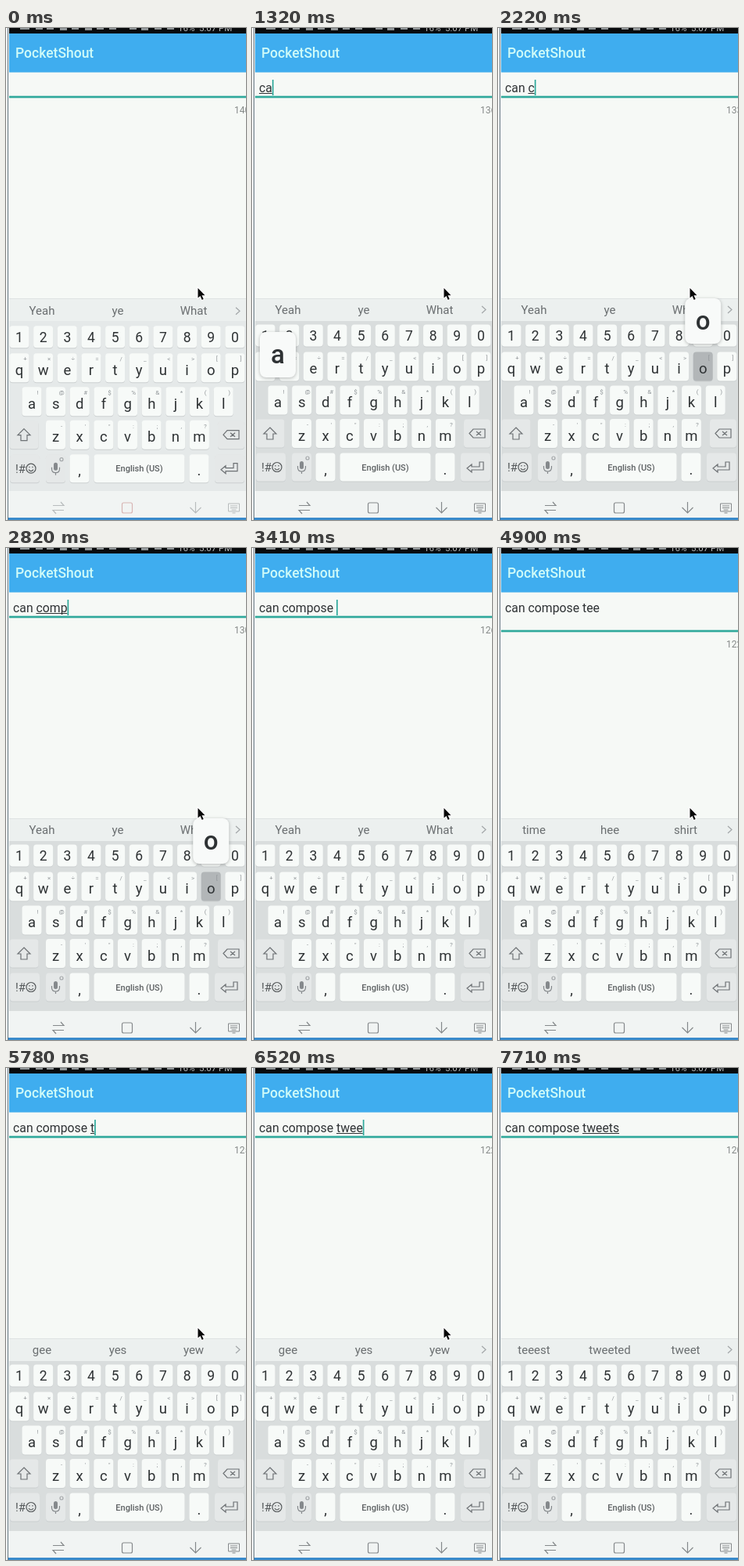
An HTML page with a canvas for the animation above (8000 ms loop, 307 px wide and 628 px high).

```html
<!DOCTYPE html>
<html lang="en">
<head>
<meta charset="utf-8">
<style>
html, body { margin: 0; width: 307px; height: 628px; overflow: hidden; background: #f6f9f6; }
canvas { display: block; }
</style>
</head>
<body>
<canvas id="stage" width="307" height="628"></canvas>
<script>
const ctx = document.getElementById('stage').getContext('2d');
const LOOP = 8000;
const FONT = 'Roboto, "Noto Sans", sans-serif';
const TEAL = '#2fa99b';
const INK = '#2e3234';

// [time, typed text, key with popup or highlight, key still held down]
const STEPS = [
  [0, ''], [580, '', 'i', 1], [730, 'I', 'i'], [880, 'I', ' ', 1],
  [1030, 'I ', 'c', 1], [1180, 'I c', 'a', 1], [1320, 'I ca', 'a'],
  [1470, 'I ca', 'n', 1], [1620, 'I can', 'n'], [1770, 'I can', ' ', 1],
  [1920, 'I can ', 'c', 1], [2070, 'I can c', 'c'], [2220, 'I can c', 'o', 1],
  [2370, 'I can co', 'o'], [2520, 'I can co', 'm', 1], [2670, 'I can com', 'p', 1],
  [2820, 'I can comp', 'o', 1], [2970, 'I can compo', 's', 1],
  [3120, 'I can compos', 'e', 1], [3260, 'I can compose', ' ', 1], [3410, 'I can compose '],
  [3860, 'I can compose ', 't', 1], [4010, 'I can compose t', 't'],
  [4160, 'I can compose t', 'e', 1], [4310, 'I can compose te', 'e'],
  [4450, 'I can compose te', 'e', 1], [4600, 'I can compose tee', 'e'],
  [4750, 'I can compose tee', 'enter', 1], [4900, 'I can compose tee\n'],
  [5040, 'I can compose tee\n', 'back', 1], [5190, 'I can compose tee'],
  [5480, 'I can compose tee', 'back', 1], [5630, 'I can compose te', 'back', 1],
  [5780, 'I can compose t'], [5930, 'I can compose t', 'w', 1],
  [6080, 'I can compose tw', 'w'], [6220, 'I can compose tw', 'e', 1],
  [6370, 'I can compose twe', 'e', 1], [6520, 'I can compose twee'],
  [6660, 'I can compose twee', 't', 1], [6810, 'I can compose tweet', 't'],
  [6960, 'I can compose tweet'], [7110, 'I can compose tweet', 's', 1],
  [7260, 'I can compose tweets', 's'], [7410, 'I can compose tweets']
];
const HINTS = [
  [0, 'Yeah', 'ye', 'What'], [4750, 'time', 'hee', 'shirt'],
  [5780, 'gee', 'yes', 'yew'], [7560, 'teeest', 'tweeted', 'tweet']
];
const CURSOR_OFF = [[3560, 3860], [7560, LOOP]];

// Keyboard layout: centre x, centre y, width, height
const keys = {};
function addRow(chars, alts, x, y, h) {
  [...chars].forEach((c, i) => keys[c] = { x: x + 30.65 * i, y, w: 25, h, alt: alts[i] });
}
addRow('1234567890', '', 17, 392.5, 28);
addRow('qwertyuiop', '+×÷=/_<>[]', 17, 432, 37);
addRow('asdfghjkl', '!@#$%&*()', 33, 475, 37);
addRow('zxcvbnm', '-\'":;,?', 63.5, 517.5, 37);
const special = (x, y, w, fill) => ({ x, y, w, h: 36, fill, label: '' });
keys.shift = special(23, 517.5, 37, '#e5e8e8');
keys.back = special(288, 517.5, 34, '#e5e8e8');
keys.sym = special(24, 560.5, 38, '#e5e8e8');
keys.mic = special(63.5, 560.5, 25, '#e5e8e8');
keys[','] = { x: 94, y: 560.5, w: 25, h: 36 };
keys[' '] = special(170.5, 560.5, 116);
keys['.'] = { x: 247, y: 560.5, w: 25, h: 36 };
keys.enter = special(286, 560.5, 38, '#e5e8e8');

const at = (list, t) => list.findLast(s => s[0] <= t);

function rect(x, y, w, h, color) {
  ctx.fillStyle = color;
  ctx.fillRect(x, y, w, h);
}
function text(s, x, y, size, color, align = 'left', weight = 400) {
  ctx.font = `${weight} ${size}px ${FONT}`;
  ctx.textAlign = align;
  ctx.fillStyle = color;
  ctx.fillText(s, x, y);
  return ctx.measureText(s).width;
}
function box(x, y, w, h, r, color) {
  ctx.beginPath();
  ctx.roundRect(x, y, w, h, r);
  ctx.fillStyle = color;
  ctx.fill();
}
function stroke(d, color = '#6d7174', width = 1.2) {
  ctx.strokeStyle = color;
  ctx.lineWidth = width;
  ctx.stroke(new Path2D(d));
}

function drawHeader() {
  rect(0, 0, 307, 628, '#f6f9f6');
  rect(4, 0, 303, 7, '#080a0c');
  for (const x of [18, 38, 52, 69, 84, 101, 116, 132, 158, 173, 190, 206])
    rect(x, 0, x < 25 ? 12 : 9, 2 + x % 2, '#8f9496');
  text('16%  5:07 PM', 220, 3.5, 11.5, '#b9bdbf');
  rect(4, 7, 303, 49, '#3fadef');
  rect(4, 56, 303, 1, '#86cbee');
  text('PocketShout', 12, 38, 17.5, '#cffbf8', 'left', 500);
}

// The field starts left of the visible area, so its first letter is cut off.
function drawField(t, typed) {
  const left = 0.8;
  const wrapped = typed.endsWith('\n');
  const drop = wrapped ? 18 : 0;
  const width = text(typed.replace('\n', ''), left, 81.5, 15.8, INK);
  const word = typed.match(/\S*$/)[0];
  const wordWidth = ctx.measureText(word).width;
  rect(left + width - wordWidth, 83, wordWidth, 1, INK);
  rect(4, 86 + drop, 303, 4, '#2fa99b55');
  rect(4, 87 + drop, 303, 2, TEAL);
  if (!CURSOR_OFF.some(([a, b]) => t >= a && t < b))
    rect(left + (wrapped ? 0 : width), 66 + drop, 1.7, 20, TEAL);
  text(140 - typed.length, 292, 108.5 + drop, 12, '#858988');
}

function drawIcons() {
  stroke('M23 510 L31 518 H27 V525 H19 V518 H15 Z');
  stroke('M278 517.5 L283 512 H298 V523 H283 Z M287 515 L293 520 M293 515 L287 520');
  text('!#', 12, 566, 15, '#55595b');
  stroke('M38 560.5 a6 6 0 1 1 -12 0 a6 6 0 1 1 12 0 M29 562 q3 4 6 0 M30 558 v1.5 M34 558 v1.5', '#55595b');
  box(61, 553, 5, 10, 2.5, '#85898c');
  stroke('M58.5 559 v2 q0 5 5 5 t5 -5 v-2 M63.5 566 v3', '#85898c');
  stroke('M73 549 a2 2 0 1 1 -4 0 a2 2 0 1 1 4 0', '#a5a9ab');
  text('English (US)', 170.5, 564.5, 11, '#5c6062', 'center', 500);
  stroke('M281 557 L275 562 L281 567 V564 H296 V554 H291 V560 H281 Z');
}

function drawNav(pale) {
  rect(4, 591, 303, 34, '#f1f4f3');
  const c = pale ? '#b8bcbd' : '#85898b';
  stroke('M60 609.5 H74 L70 605 M74 615.5 H60 L64 620', c);
  stroke('M150.5 606 h9 q2 0 2 2 v9 q0 2 -2 2 h-9 q-2 0 -2 -2 v-9 q0 -2 2 -2 Z', pale ? '#d8b5b3' : c);
  stroke('M242.5 605 V619 M235.5 612 L242.5 619 L249.5 612', c);
  stroke('M284.5 607 h14 v10 h-14 Z M287 610 h9 M287 612.5 h9 M288.5 615 h6 M289.5 619 h4', c, 1);
}

function drawKeyboard(t, key, held) {
  const settling = t < 140 ? 1.7 : t < 290 ? 0.8 : 0;
  rect(4, 345, 303, 30, '#ecf0ef');
  rect(4, 345, 303, 1, '#dfe3e3');
  rect(4, 374, 303, 217, settling ? '#e5e9e9' : '#d9dddd');
  ctx.save();
  ctx.translate(0, settling);
  at(HINTS, t).slice(1).forEach((s, i) => text(s, 46 + 97 * i, 364.5, 15, '#6a6e70', 'center'));
  stroke('M294 355 l5 4.5 l-5 4.5', '#a2a6a8');
  for (const [name, k] of Object.entries(keys)) {
    const { x, y, w, h } = k;
    const down = held && name === key;
    box(x - w / 2, y - h / 2 + 1, w, h, 4, '#cbcfd0');
    box(x - w / 2, y - h / 2, w, h, 4, down ? '#b2b6b8' : k.fill || '#f7faf8');
    const low = h > 30 ? 9 : 6.5;
    text(k.label ?? name, x, y + low, h > 30 ? 18.5 : 17.5, INK, 'center');
    if (k.alt) text(k.alt, x + 7.5, y - 8.5, 8, '#92979a', 'center');
  }
  drawIcons();
  ctx.restore();
  drawNav(settling > 0);
  if (key && key.length === 1 && key !== ' ') {
    const { x, y } = keys[key];
    ctx.save();
    ctx.shadowColor = '#0004';
    ctx.shadowBlur = 4;
    ctx.shadowOffsetY = 1;
    box(x - 23, y - 87, 46, 58, 8, '#f8faf9');
    ctx.restore();
    text(key, x, y - 47.5, 33, INK, 'center', 500);
  }
}

function drawEdges() {
  rect(0, 0, 4, 628, '#f0f3f3');
  rect(2, 0, 1, 628, '#687984');
  rect(3, 625, 304, 3, '#398acb');
}

function drawPointer() {
  const arrow = new Path2D('M245.5 332 V344.5 L248.5 342 L250.7 347 L252.7 346 L250.5 341.3 H254.5 Z');
  ctx.lineWidth = 2;
  ctx.strokeStyle = '#fff';
  ctx.stroke(arrow);
  ctx.fillStyle = '#080808';
  ctx.fill(arrow);
}

function draw(t) {
  const [, typed, key, held] = at(STEPS, t);
  drawHeader();
  drawField(t, typed);
  drawKeyboard(t, key, held);
  drawEdges();
  if (t < 7560) drawPointer();
}

const start = performance.now();
function tick() {
  draw((performance.now() - start) % LOOP);
  requestAnimationFrame(tick);
}
tick();
</script>
</body>
</html>
```
